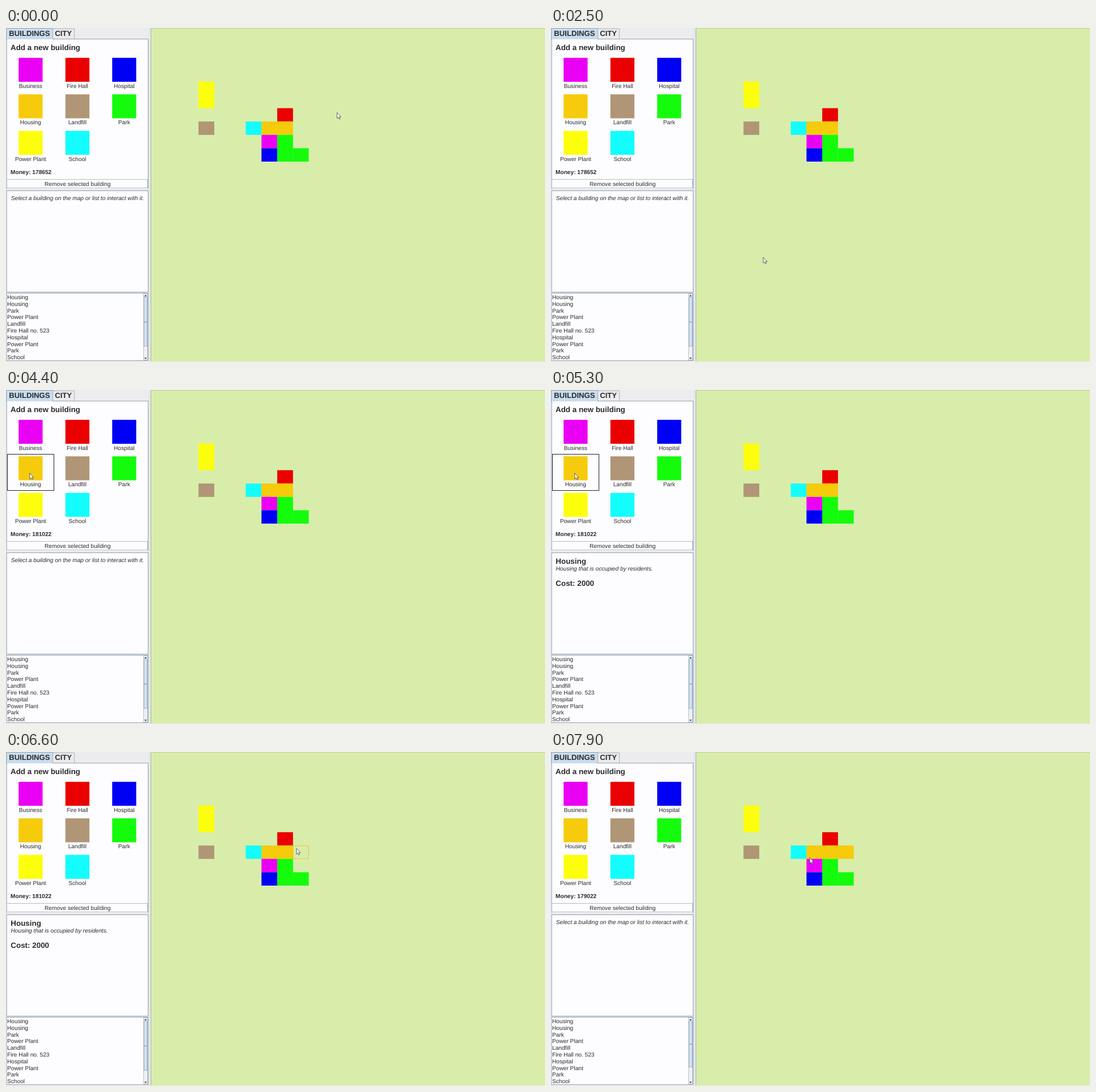
Animation, 950 px wide and 590 px high, one loop 8000 ms. Source, as an HTML page:

```html
<!DOCTYPE html>
<html lang="en">
<head>
<meta charset="utf-8">
<title>City builder</title>
<style>
  html, body { margin: 0; width: 100%; height: 100%; overflow: hidden; background: #eee; }
  svg { display: block; width: 950px; height: 590px; }
  text { font: 10.16px "Liberation Sans", Arial, sans-serif; fill: #2b2b2d; text-rendering: geometricPrecision; white-space: pre; }
  .b { font-weight: bold; }
  .i { font-style: italic; }
  .h { font-weight: bold; font-size: 13.4px; }
  .t { font-weight: bold; font-size: 13.15px; }
  .m { text-anchor: middle; }
</style>
</head>
<body>
<svg id="stage" viewBox="0 0 950 590"></svg>
<script>
const LOOP = 8000, STEP = 100;
const SELECT = 4600, PLACE = 7600, PAYDAY = 4200;
const CELL_W = 27.76, CELL_H = 23.6, MAP_X = 256;
const LINE = "#93a2b2";

const colors = {
  "Business": "#ea00f4", "Fire Hall": "#ea0000", "Hospital": "#0000f4",
  "Housing": "#f6cb0b", "Landfill": "#b09676", "Park": "#14fc0c",
  "Power Plant": "#fdfe0c", "School": "#14fdfe"
};

const stage = document.getElementById("stage");

function add(tag, attrs, parent = stage) {
  const el = document.createElementNS("http://www.w3.org/2000/svg", tag);
  for (const k in attrs) el.setAttribute(k, attrs[k]);
  parent.appendChild(el);
  return el;
}
const box = (x, y, width, height, fill, stroke, parent) =>
  add("rect", { x, y, width, height, fill, stroke: stroke || "none" }, parent);

function label(str, x, y, cls = "", parent) {
  const el = add("text", { x, y, class: cls }, parent);
  el.textContent = str;
  return el;
}
const show = (el, on) => el.setAttribute("visibility", on ? "visible" : "hidden");

// Window frame and tabs
box(0, 0, 950, 590, "#ececee");
box(0.5, 0.5, 82, 20, "#c9dced", LINE);
box(82.5, 1.5, 38, 18, "#ebebed", "#a9b4be");
label("BUILDINGS", 5.3, 14, "t");
label("CITY", 86.2, 14, "t");
box(1.2, 19.5, 249.3, 265, "#fdfcfe", LINE);
box(1, 19, 81, 1, "#c9dced");

// Palette of buildings
label("Add a new building", 8, 39, "h");
Object.keys(colors).forEach((name, i) => {
  const x = 22.2 + (i % 3) * 82.5, y = 52.7 + Math.floor(i / 3) * 64.5;
  box(x, y, 42.3, 42.3, colors[name]);
  label(name, x + 21.1, y + 53.2, "m");
});
const hover = box(2.5, 113.5, 82, 64, "none", "#222226");
const money = label("", 8, 258.3, "b");
box(1.5, 267.5, 248, 15, "#fdfcfe", "#b4bcc6");
label("Remove selected building", 126.2, 278.6, "m");

// Details
box(0, 284, 251, 4, "#e6e7ea");
box(1.2, 287.5, 249.3, 179, "#fdfcfe", LINE);
const hint = label("Select a building on the map or list to interact with it.", 8.8, 303.5, "i");
const details = add("g", {});
label("Housing", 8.3, 306.8, "h", details);
label("Housing that is occupied by residents.", 8.5, 319.2, "i", details);
label("Cost: 2000", 8.3, 346, "h", details);

// Building list with its scroll bar
box(0.7, 468.5, 249.8, 119, "#fdfcfe", LINE);
["Housing", "Housing", "Park", "Power Plant", "Landfill", "Fire Hall no. 523",
 "Hospital", "Power Plant", "Park", "School"]
  .forEach((name, i) => label(name, 2, 478.9 + i * 11.8));
box(242.5, 469.5, 7, 117, "#eef0f2", "#b9c2cb");
const thumb = box(243.5, 475.5, 5, 87, "#d6e4f1", "#a3b8cd");
const grip = box(244, 518.5, 4, 1.5, "#8fa6bf");
add("path", { d: "M243.8 474l2.2-2.6 2.2 2.6zM243.8 582.4l2.2 2.6 2.2-2.6z", fill: "#333" });

// Map
box(251, 0, 5, 590, "#e4e6ea");
box(255, 0, 1, 590, "#a9b5b5");
box(256, 0, 694, 589, "#d8edaa");
box(256, 0, 694, 1, "#bccba4");
box(0, 589, 950, 1, "#e9ebe6");

const tile = (name, col, row, w = 1, h = 1) =>
  box(MAP_X + col * CELL_W, row * CELL_H, w * CELL_W, h * CELL_H, colors[name]);
tile("Power Plant", 3, 4, 1, 2);
tile("Landfill", 3, 7);
tile("Fire Hall", 8, 6);
tile("School", 6, 7);
tile("Housing", 7, 7, 2);
tile("Business", 7, 8);
tile("Hospital", 7, 9);
tile("Park", 8, 8, 1, 2);
tile("Park", 9, 9);
const house = tile("Housing", 9, 7);
const ghost = box(0, 0, CELL_W - 1, CELL_H - 1, "none", "#f0c32c");

const pointer = add("path", {
  d: "M0 0V10.2L2.3 8.1 3.9 11.6 5.5 10.9 4 7.5H7.1Z",
  fill: "#fff", stroke: "#3c3c44", "stroke-width": 0.8, "stroke-linejoin": "round"
});

// Pointer stops: time, x, y
const stops = [
  [0, 583.5, 149.5], [800, 802.7, 153], [1400, 802.7, 153],
  [1900, 479, 370], [2000, 479, 370], [2500, 374, 405], [2900, 408, 290],
  [3800, 41.8, 147], [5600, 41.8, 147], [5900, 361, 154], [6000, 361, 154],
  [6600, 512, 170.3], [6900, 524, 176], [7000, 524, 176],
  [7200, 512, 172], [7500, 511, 172], [7900, 456, 186.5], [8000, 456, 186.5]
];

function pointerAt(t) {
  const i = stops.findIndex(s => s[0] > t);
  const [t0, x0, y0] = stops[i - 1], [t1, x1, y1] = stops[i];
  const u = (t - t0) / (t1 - t0), e = u * u * (3 - 2 * u);
  return [x0 + (x1 - x0) * e, y0 + (y1 - y0) * e];
}

function draw(now) {
  const t = Math.floor(now % LOOP / STEP) * STEP;
  const [x, y] = pointerAt(t);
  pointer.setAttribute("transform", `translate(${x} ${y})`);

  const onCard = x > 2 && x < 249 && y > 49 && y < 242;
  show(hover, onCard);
  if (onCard) {
    hover.setAttribute("x", 2.5 + Math.floor((x - 2) / 82.5) * 82.5);
    hover.setAttribute("y", 49 + Math.floor((y - 48.5) / 64.5) * 64.5);
  }

  const chosen = t >= SELECT && t < PLACE, placed = t >= PLACE;
  show(details, chosen);
  show(hint, !chosen);
  show(house, placed);
  show(ghost, chosen && x > MAP_X);
  ghost.setAttribute("x", MAP_X + 0.5 + Math.floor((x - MAP_X) / CELL_W) * CELL_W);
  ghost.setAttribute("y", 0.5 + Math.floor(y / CELL_H) * CELL_H);

  money.textContent = "Money: " + (placed ? 179022 : t >= PAYDAY ? 181022 : 178652);
  thumb.setAttribute("height", placed ? 81 : 87);
  grip.setAttribute("y", placed ? 515.5 : 518.5);
}

const start = performance.now();
function tick() {
  draw(performance.now() - start);
  requestAnimationFrame(tick);
}
tick();
</script>
</body>
</html>
```
